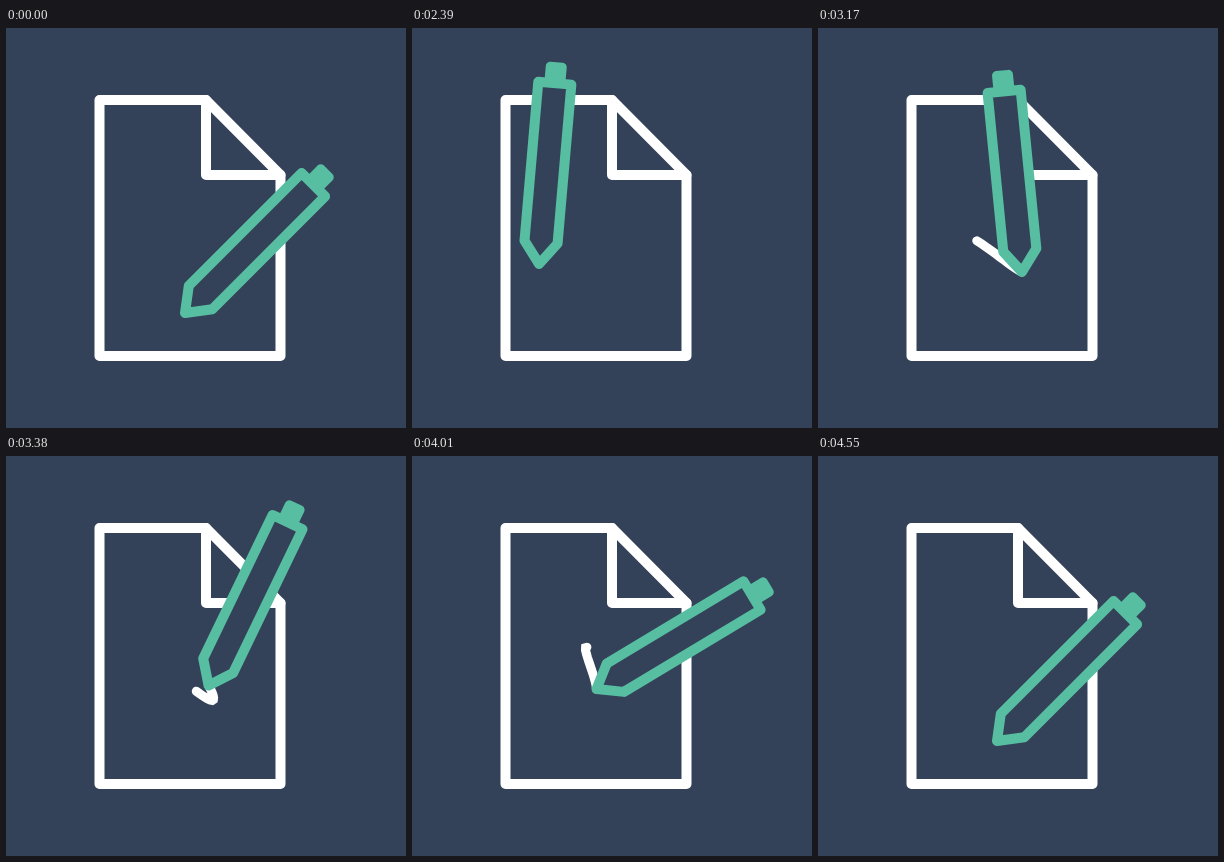
Animation of 400 by 400 pixels, one loop 4.64 s. Source, as an HTML page with a canvas:

```html
<!DOCTYPE html>
<html>
<head>
<meta charset="utf-8">
<style>
html, body { margin: 0; height: 100%; overflow: hidden; background: #334259; }
canvas { display: block; }
</style>
</head>
<body>
<canvas id="stage" width="400" height="400"></canvas>
<script>
const ctx = document.getElementById('stage').getContext('2d');
const LOOP = 4640, STEP = 30, START = 2000, END = 4550;
const NAVY = '#334259', WHITE = '#fff', GREEN = '#57bea1';
const INK_START = 2540, INK_END = 4200, INK_LIFE = 330;

// Turning points of the pen tip: time, x, y
const turns = [
  [START, 179, 285],
  [2450, 119, 227],
  [2540, 116.5, 211],
  [2670, 125, 200],
  [2810, 154, 210],
  [3170, 204, 244],
  [3350, 204.5, 233],
  [3650, 177, 193],
  [3740, 173.5, 194],
  [4010, 184.5, 233],
  [END, 179, 285]
];

function slope(i, k) {
  const a = turns[i - 1], b = turns[i + 1];
  return a && b ? (b[k] - a[k]) / (b[0] - a[0]) : 0;
}

// Smooth curve through the turning points
function tipAt(t) {
  t = Math.min(Math.max(t, START), END);
  const next = Math.max(1, turns.findIndex(p => p[0] >= t));
  const a = turns[next - 1], b = turns[next], d = b[0] - a[0];
  const u = (t - a[0]) / d, v = 1 - u;
  return [1, 2].map(k =>
    v * v * (1 + 2 * u) * a[k] + u * u * (3 - 2 * u) * b[k] +
    d * u * v * (v * slope(next - 1, k) - u * slope(next, k)));
}

function ease(t, from, to) {
  const u = Math.min(Math.max((t - from) / (to - from), 0), 1);
  return (1 - Math.cos(Math.PI * u)) / 2;
}

// Degrees: swing left, swing right, settle
function tiltAt(t) {
  return 45 - 81.7 * ease(t, START, 2790) + 95.7 * ease(t, 2790, 3775) - 14 * ease(t, 4010, END);
}

function trace(points, closed) {
  ctx.beginPath();
  points.forEach(([x, y]) => ctx.lineTo(x, y));
  if (closed) ctx.closePath();
}

function outline(points, color, closed, width = 10, join = 'round') {
  trace(points, closed);
  ctx.strokeStyle = color;
  ctx.lineWidth = width;
  ctx.lineJoin = join;
  ctx.lineCap = 'round';
  ctx.stroke();
}

function drawPage() {
  outline([[93.5, 72], [200, 72], [274.5, 147], [274.5, 328], [93.5, 328]], WHITE, true);
  outline([[200, 72], [200, 147], [274.5, 147]], WHITE);
}

function drawInk(t) {
  const points = [];
  for (let age = 0; age <= INK_LIFE; age += STEP) {
    const s = t - age;
    if (s >= INK_START && s <= INK_END) points.push(tipAt(s));
  }
  outline(points, WHITE, false, 9, 'miter');
}

function drawPen(t) {
  const side = 16.6, neck = -22, top = -181.5;
  const body = [[0, 0], [-side, neck], [-side, top], [side, top], [side, neck]];
  ctx.save();
  ctx.translate(...tipAt(t));
  ctx.rotate(tiltAt(t) * Math.PI / 180);
  ctx.fillStyle = GREEN;
  ctx.beginPath();
  ctx.roundRect(-10.5, -202.5, 21, 24, 4.5);
  ctx.fill();
  trace(body, true);
  ctx.fillStyle = NAVY;
  ctx.fill();
  outline(body, GREEN, true);
  ctx.restore();
}

function frame() {
  const now = performance.now() % LOOP;
  const t = START + Math.floor((now - START) / STEP) * STEP;
  ctx.fillStyle = NAVY;
  ctx.fillRect(0, 0, 400, 400);
  drawPage();
  drawInk(t);
  drawPen(t);
  requestAnimationFrame(frame);
}
frame();
</script>
</body>
</html>
```
